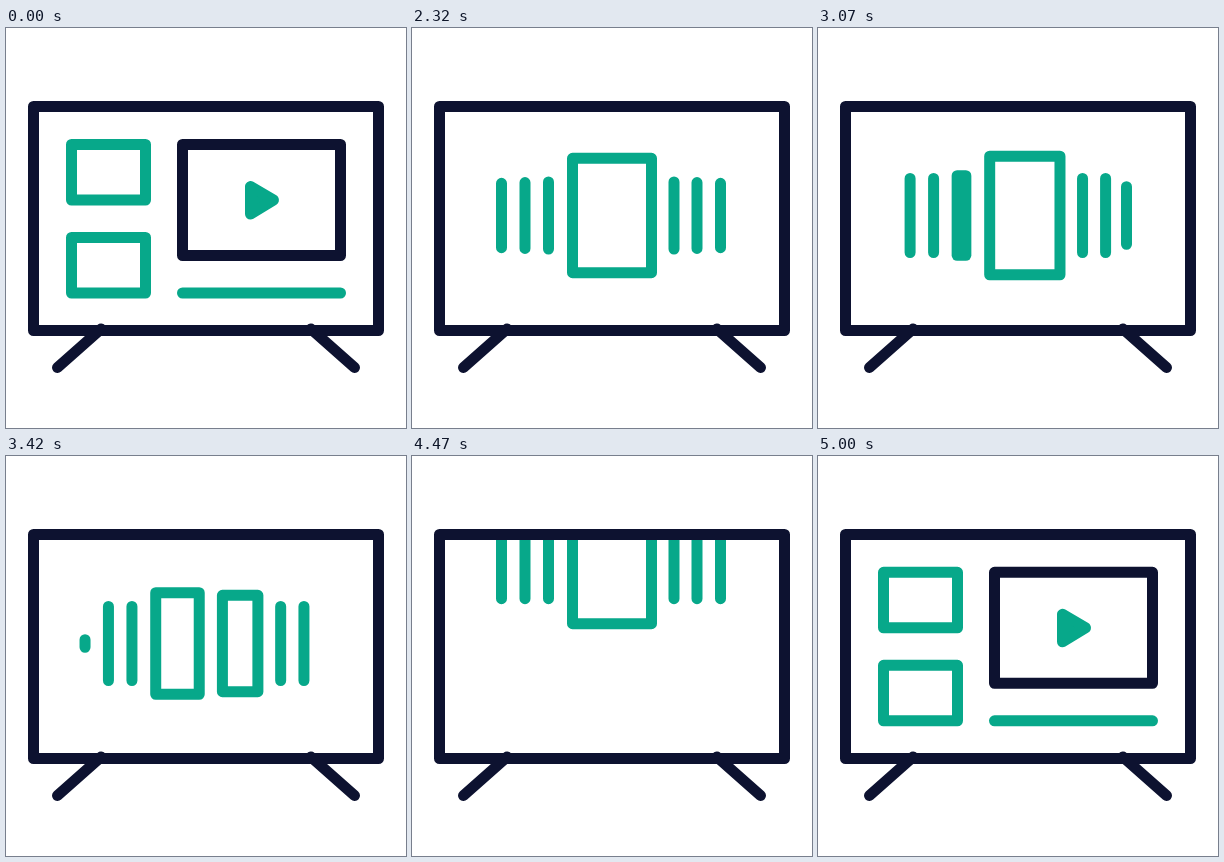
These frames come from a looping animation (400 px wide and 400 px high, 5020 ms). An HTML page:

```html
<!DOCTYPE html>
<html lang="en">
<head>
<meta charset="utf-8">
<title>Smart TV</title>
<style>
  html, body { margin: 0; width: 100%; height: 100%; overflow: hidden; background: #fff; }
  svg { display: block; width: 100%; height: 100%; }
  .line { fill: none; stroke-width: 11; stroke-linecap: round; stroke-linejoin: round; }
  .navy { stroke: #0d1230; }
  .green { stroke: #07a88a; }
  .solid { fill: #07a88a; }
</style>
</head>
<body>
<svg viewBox="0 0 400 400">
  <clipPath id="screen"><rect x="33" y="84" width="334" height="213"/></clipPath>
  <path class="line navy" d="M51.5 339.5L95 301M348.5 339.5L305 301"/>
  <g clip-path="url(#screen)">
    <g id="carousel"></g>
    <g id="home">
      <rect class="line green" x="65.5" y="116.5" width="74" height="55.5"/>
      <rect class="line green" x="65.5" y="209.5" width="74" height="55.5"/>
      <rect class="line navy" x="176.5" y="116.5" width="158" height="111"/>
      <path class="line green solid" d="M244.5 158.5V186L267.5 172Z"/>
      <path class="line green" d="M176.5 265H334.5"/>
    </g>
  </g>
  <rect class="line navy" x="27.5" y="78.5" width="345" height="224"/>
</svg>
<script>
  const LOOP = 5020;
  const MID = 187.5;
  const BAR = 37;
  const STEPS = [2478, 2895, 3312];
  const STEP_TIME = 230;
  const GROW_TIME = 250;

  const bar = x => ({ l: x, r: x, h: BAR });
  const slots = [
    bar(89.5), bar(113), bar(136.5),
    { l: 160.5, r: 239.5, h: 62 },
    bar(262), bar(285), bar(308.5)
  ];

  const home = document.getElementById('home');
  const carousel = document.getElementById('carousel');
  const items = Array.from({ length: slots.length + 1 }, () => {
    const p = document.createElementNS('http://www.w3.org/2000/svg', 'path');
    p.setAttribute('class', 'line green');
    return carousel.appendChild(p);
  });

  const part = (t, start, time) => Math.min(1, Math.max(0, (t - start) / time));
  const mix = (a, b, p) => a + (b - a) * p;
  const easeIn = (p, n) => p ** n;
  const easeOut = (p, n) => 1 - (1 - p) ** n;
  const easeBoth = p => p < 0.5 ? 2 * p * p : 1 - 2 * (1 - p) ** 2;

  function shape(el, { l, r, h }) {
    el.setAttribute('d', h > 0.2 ? `M${l} ${MID - h}H${r}V${MID + h}H${l}Z` : '');
  }

  // Grows from the centre item outwards.
  function grow(t) {
    slots.forEach((s, i) => {
      const start = 2203 + 6 * Math.abs(i - 3);
      shape(items[i], { ...s, h: s.h * easeOut(part(t, start, GROW_TIME), 4) });
    });
    shape(items[7], bar(0).h && { l: 0, r: 0, h: 0 });
  }

  // Every item moves one slot left; the first shrinks away, a new last one grows.
  function step(p) {
    slots.forEach((s, i) => {
      const to = i ? slots[i - 1] : { l: 66.2, r: 66.2, h: -BAR };
      shape(items[i], {
        l: mix(s.l, to.l, p),
        r: mix(s.r, to.r, p),
        h: mix(s.h, to.h, p)
      });
    });
    shape(items[7], { l: 308.5, r: 308.5, h: BAR * (2 * p - 1) });
  }

  function draw(t) {
    const drop = 4640;
    const x = t < drop ? 310 * easeIn(part(t, 2000, 250), 2) : 0;
    const y = t < drop ? 0 : -190 * (1 - easeOut(part(t, drop, 372), 2));
    home.setAttribute('transform', `translate(${x} ${y})`);

    const rise = -174 * easeIn(part(t, 3880, 760), 3);
    carousel.setAttribute('transform', `translate(0 ${rise})`);
    carousel.style.display = t > 2200 && t < drop ? '' : 'none';

    if (t < STEPS[0]) grow(t);
    else step(easeBoth(part(t, STEPS.findLast(s => s <= t), STEP_TIME)));
  }

  function tick() {
    draw(performance.now() % LOOP);
    requestAnimationFrame(tick);
  }
  tick();
</script>
</body>
</html>
```
